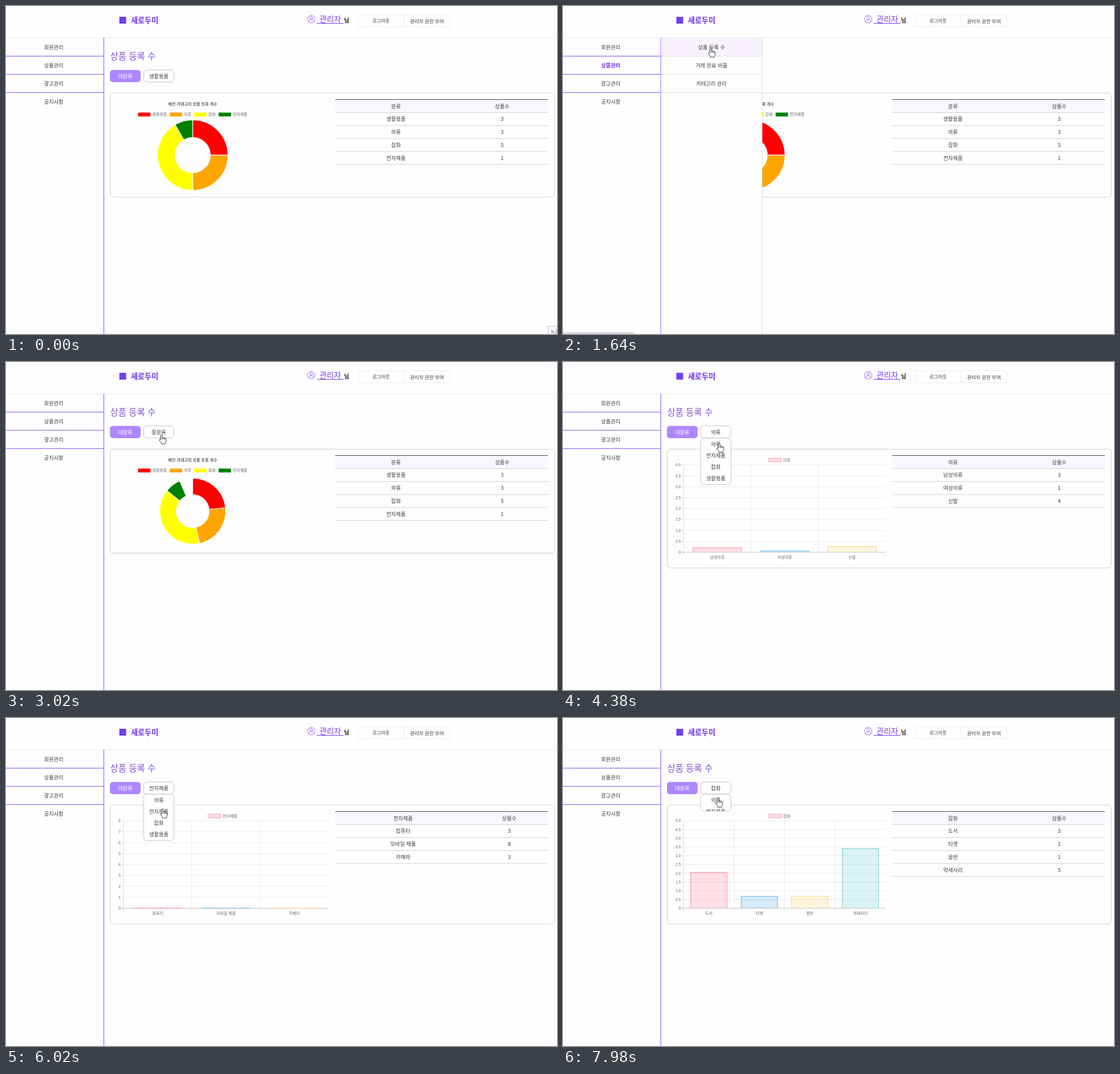
An HTML page that plays this animation: 970 by 577 pixels, repeating every 8000 ms.

```html
<!DOCTYPE html>
<html lang="ko">
<head>
<meta charset="utf-8">
<title>상품 등록 수</title>
<style>
html, body { margin: 0; width: 100%; height: 100%; overflow: hidden; background: #fefefe; }
svg { display: block; width: 100%; height: 100%; font-family: "Noto Sans CJK KR", "Noto Sans CJK JP", "Noto Sans CJK", sans-serif; }
.num { font-family: "Liberation Sans", Arial, sans-serif; }
</style>
</head>
<body>
<svg viewBox="0 0 970 577">
  <g id="content"></g>
  <g id="frame"></g>
  <g id="overlay"></g>
</svg>
<script>
const LOOP = 8000;
const PURPLE = '#8347fb';
const clamp = v => Math.min(1, Math.max(0, v));
const outQuart = v => 1 - (1 - clamp(v)) ** 4;
const swing = v => 0.5 - Math.cos(Math.PI * clamp(v)) / 2;
const layer = id => document.getElementById(id);

// --- drawing helpers -------------------------------------------------
function text(s, x, y, o = {}) {
  const { size = 9.25, fill = '#3c3c3c', anchor = 'middle', weight = 400, num = false } = o;
  return `<text x="${x}" y="${y + size * (num ? 0.35 : 0.38)}" font-size="${size}" fill="${fill}"` +
    ` text-anchor="${anchor}" font-weight="${weight}"${num ? ' class="num"' : ''}>${s}</text>`;
}
const line = (x1, y1, x2, y2, stroke, w = 1) =>
  `<path d="M${x1} ${y1}L${x2} ${y2}" stroke="${stroke}" stroke-width="${w}"/>`;
const rect = (x, y, w, h, fill, stroke = 'none', r = 0, sw = 1) =>
  `<rect x="${x}" y="${y}" width="${w}" height="${h}" rx="${r}" fill="${fill}" stroke="${stroke}" stroke-width="${sw}"/>`;

// --- data ------------------------------------------------------------
const MAIN = {
  title: '분류', cols: [686.5, 873.5],
  rows: [['생활용품', 3], ['의류', 3], ['잡화', 5], ['전자제품', 1]]
};
const CLOTHES = {
  title: '의류', start: 4363, axis: 212.3, max: 4, step: 0.5, cols: [686.5, 873.5],
  rows: [['남성의류', 3], ['여성의류', 1], ['신발', 4]]
};
const ELECTRONICS = {
  title: '전자제품', start: 6020, axis: 206.7, max: 8, step: 1, cols: [699, 886],
  rows: [['컴퓨터', 3], ['모바일 제품', 8], ['카메라', 3]]
};
const GOODS = {
  title: '잡화', start: 7730, axis: 212.3, max: 5, step: 0.5, cols: [686.5, 873.5],
  rows: [['도서', 3], ['티켓', 1], ['음반', 1], ['악세사리', 5]]
};
const BARS = [CLOTHES, ELECTRONICS, GOODS];
const BAR_RGB = ['255,99,132', '54,162,235', '255,206,86', '75,192,192'];
const RING = ['red', 'orange', 'yellow', 'green'];
const LEGEND_X = [232.5, 288.3, 331.3, 374.3];
const RELOAD = 2525;
const MENU_IN = 800, MENU_OUT = 2080;
const DROPS = [[3400, 4375], [5300, 6025], [6900, 7745]];

// time, x, y of the pointer tip
const PATH = [
  [70, 975, 585], [300, 860, 330], [480, 560, 90], [620, 300, 34], [800, 112, 96],
  [1000, 120, 104], [1250, 215, 100], [1450, 258, 77], [1640, 260, 74], [2300, 260, 74],
  [2600, 263, 70], [2960, 274, 128], [3450, 274, 128], [3750, 276, 146], [4360, 275, 143],
  [4500, 275, 143], [4800, 273, 125], [5400, 273, 125], [5750, 276, 160], [6040, 276, 160],
  [6400, 278, 125], [6980, 278, 125], [7350, 274, 182], [7740, 274, 182], [7980, 273, 141]
];

// --- content ---------------------------------------------------------
function table({ title, cols, rows }) {
  let s = rect(579.5, 164.5, 374.5, 23, '#f9f6ff') + line(579.5, 164.5, 954, 164.5, '#4a4a4a');
  [[title, '상품수'], ...rows].forEach((row, i) => {
    const y = 176 + i * 22.8;
    row.forEach((cell, c) => s += text(cell, cols[c], y));
    s += line(579.5, y + 11.5, 954, y + 11.5, '#cfcfcf');
  });
  return s;
}

function doughnut(p) {
  const cx = 328.7, cy = 262.4, R = 62 * p, r = 31 * p;
  const at = (a, d) => `${cx + d * Math.sin(a)} ${cy - d * Math.cos(a)}`;
  let s = text('메인 카테고리 상품 등록 개수', cx, 172.3, { size: 7.1, weight: 700, fill: '#666' });
  let a = 0;
  MAIN.rows.forEach(([name, n], i) => {
    s += rect(LEGEND_X[i], 187.5, 21.8, 6.8, RING[i]);
    s += text(name, LEGEND_X[i] + 25, 190.5, { size: 7, fill: '#666', anchor: 'start' });
    const b = a + n / 12 * 2 * Math.PI * p;
    if (p > 0) {
      s += `<path d="M${at(a, R)}A${R} ${R} 0 0 1 ${at(b, R)}L${at(b, r)}A${r} ${r} 0 0 0 ${at(a, r)}Z"` +
        ` fill="${RING[i]}" stroke="#fff" stroke-width="1.1"/>`;
    }
    a = b;
  });
  return s;
}

function barChart({ title, axis, max, step, rows }, p) {
  const top = 181, base = 334.6, right = 568;
  const pitch = (right - axis) / rows.length, w = pitch * 0.72;
  const lx = 381.5 - (25.5 + 6.44 * title.length) / 2;
  let s = rect(lx, 169, 21.8, 6.8, `rgba(${BAR_RGB[0]},.2)`, `rgb(${BAR_RGB[0]})`, 0, 0.6);
  s += text(title, lx + 25.3, 172, { size: 7, fill: '#666', anchor: 'start' });
  for (let v = 0; v <= max; v += step) {
    const y = base - (base - top) * v / max;
    s += line(axis - 5.5, y, right, y, v ? 'rgba(0,0,0,.1)' : 'rgba(0,0,0,.3)', 0.8);
    s += text(v && step < 1 ? v.toFixed(1) : v, axis - 5, y, { size: 6.7, fill: '#666', anchor: 'end', num: true });
  }
  rows.forEach(([name, v], i) => {
    const x = axis + pitch * i, x0 = x + (pitch - w) / 2, h = (base - top) * v / max * p;
    s += line(x, top, x, base + 5.5, i ? 'rgba(0,0,0,.1)' : 'rgba(0,0,0,.17)', 0.8);
    s += `<path d="M${x0} ${base}v${-h}h${w}v${h}" fill="rgba(${BAR_RGB[i]},.2)" stroke="rgb(${BAR_RGB[i]})" stroke-width=".7"/>`;
    s += text(name, x + pitch / 2, 343, { size: 7, fill: '#666' });
  });
  return s;
}

function drawContent(t) {
  const bars = BARS.filter(b => t >= b.start).pop();
  const label = bars ? bars.title : t < RELOAD ? '생활용품' : '중분류';
  let s = text('상품 등록 수', 183.5, 88, { size: 15.5, weight: 500, fill: '#8153d6', anchor: 'start' });
  s += rect(183, 112.5, 54, 21.5, '#ae87ff', 'none', 5) + text('대분류', 210, 123.3, { fill: '#fff' });
  s += rect(242.5, 112.5, 53, 21.2, '#fff', '#c8c8c8', 5) + text(label, 269, 123.3);
  s += rect(183.5, 153.3, 781.7, bars ? 209 : 183, 'none', '#cdcdcd', 5);
  if (bars) s += barChart(bars, outQuart((t - bars.start) / 1000));
  else s += doughnut(t < RELOAD ? 1 : outQuart((t - RELOAD) / 1000));
  return s + table(bars || MAIN);
}

// --- header and side menu --------------------------------------------
function drawFrame(t) {
  const active = t >= MENU_IN && t < MENU_OUT + 200;
  let s = rect(199.5, 19, 12, 12, '#7040f2');
  s += text('새로두미', 220, 25, { size: 13.1, weight: 900, fill: '#6f2df0', anchor: 'start' });
  s += `<g fill="none" stroke="#a06cf8"><circle cx="537.3" cy="23.2" r="6.6"/><circle cx="537.3" cy="21.2" r="2.3"/>` +
    `<path d="M533 28c.6-5.3 8-5.3 8.600 0"/></g>`;
  s += text('관리자', 571, 23, { size: 13.7, fill: '#7b3cf2' }) + line(547, 30.5, 594.5, 30.5, '#7b3cf2');
  s += text('님', 599.5, 25, { size: 10, weight: 700, fill: '#222' });
  s += rect(620.5, 15.5, 160.5, 21, 'none', '#ebebeb') + line(700.7, 15.5, 700.7, 36.5, '#ebebeb');
  s += text('로그아웃', 660.3, 26.3, { size: 8.2 }) + text('관리자 권한 부여', 741, 26.3, { size: 8.5 });
  s += line(0, 55.7, 970, 55.7, '#ececec');
  ['회원관리', '상품관리', '광고관리', '공지사항'].forEach((name, i) => {
    const on = active && i === 1;
    s += text(name, 84, 72.2 + i * 32, on ? { fill: '#7427f0', weight: 700 } : {});
    if (i < 3) s += line(0, 88.2 + i * 32, 172, 88.2 + i * 32, PURPLE);
  });
  return s + line(172.2, 56, 172.2, 577, PURPLE);
}

// --- submenu, dropdown, pointer --------------------------------------
function submenu(t, x, y) {
  const alpha = clamp((t - MENU_IN) / 300) * clamp((MENU_OUT + 320 - t) / 320);
  if (!alpha) return '';
  let s = rect(172.8, 56.2, 177.7, 521, '#fefefe');
  ['상품 등록 수', '거래 완료 비율', '카테고리 관리'].forEach((name, i) => {
    const top = 56.2 + i * 32;
    if (x > 173 && y >= top && y < top + 32) s += rect(172.8, top, 177.7, 32, '#f8f2ff');
    s += text(name, 261.3, top + 16) + line(172.8, top + 32, 350.5, top + 32, '#dedede');
  });
  return `<g opacity="${alpha}">${s}${line(350.5, 56, 350.5, 577, '#dcdcdc')}</g>`;
}

function dropdown(t) {
  const [open, close] = DROPS.filter(d => t >= d[0]).pop() || [LOOP, LOOP];
  const h = 81.5 * (swing((t - open) / 400) - swing((t - close) / 400));
  if (h < 0.5) return '';
  let s = rect(242.5, 134, 53, h, '#fff', '#c8c8c8', Math.min(5, h / 2));
  s += `<clipPath id="fold"><rect x="242" y="134" width="54" height="${h}"/></clipPath><g clip-path="url(#fold)">`;
  ['의류', '전자제품', '잡화', '생활용품'].forEach((name, i) => s += text(name, 269, 144.6 + i * 20.1));
  return s + '</g>';
}

function pointerAt(t) {
  const i = PATH.findIndex(k => k[0] > t);
  if (i < 1) return (i ? PATH[PATH.length - 1] : PATH[0]).slice(1);
  const [t0, x0, y0] = PATH[i - 1], [t1, x1, y1] = PATH[i];
  const p = swing((t - t0) / (t1 - t0));
  return [x0 + (x1 - x0) * p, y0 + (y1 - y0) * p];
}

function pointer(t, x, y) {
  if (t < 70) return '';
  const hand = (t > 760 && t < 2500) || (x > 242 && x < 296 && y > 112);
  const d = hand
    ? 'M-1.500 8.500V1.200Q-1.400 0 0 0Q1.200 0 1.300 1.200V5.200Q2.800 4.500 3.700 5.700Q5.200 5.100 6 6.400Q7.800 6.100 8 8V10.800Q7.800 13 6.500 14V16H-.5V14.300L-4 9.800Q-4.600 8.200-3.200 7.900Q-2.300 7.900-1.500 9ZM1.300 5.200V8M3.700 5.700V8.300M6 6.400V8.500'
    : 'M0 0V12.500L2.900 9.800L4.900 14.300L6.800 13.500L4.900 9.100H9Z';
  return `<path transform="translate(${x} ${y})" d="${d}" fill="#fff" stroke="#222" stroke-width=".9" stroke-linejoin="round"/>`;
}

function drawOverlay(t) {
  const [x, y] = pointerAt(t);
  let s = submenu(t, x, y) + dropdown(t);
  if (t > 950 && t < 2540) s += '<path d="M0 573.500H122Q126 573.500 126 577H0Z" fill="#dcdde0"/>';
  if (t < 210) s += rect(954.5, 563.5, 30, 20, '#fff', '#c4c4c4') + text('녹화', 958.5, 573, { size: 8.5, fill: '#777', anchor: 'start' });
  return s + pointer(t, x, y);
}

function render(t) {
  layer('content').innerHTML = drawContent(t);
  layer('frame').innerHTML = drawFrame(t);
  layer('overlay').innerHTML = drawOverlay(t);
}

let origin;
function tick(now) {
  origin ??= now;
  render((now - origin) % LOOP);
  requestAnimationFrame(tick);
}
render(0);
requestAnimationFrame(tick);
</script>
</body>
</html>
```
